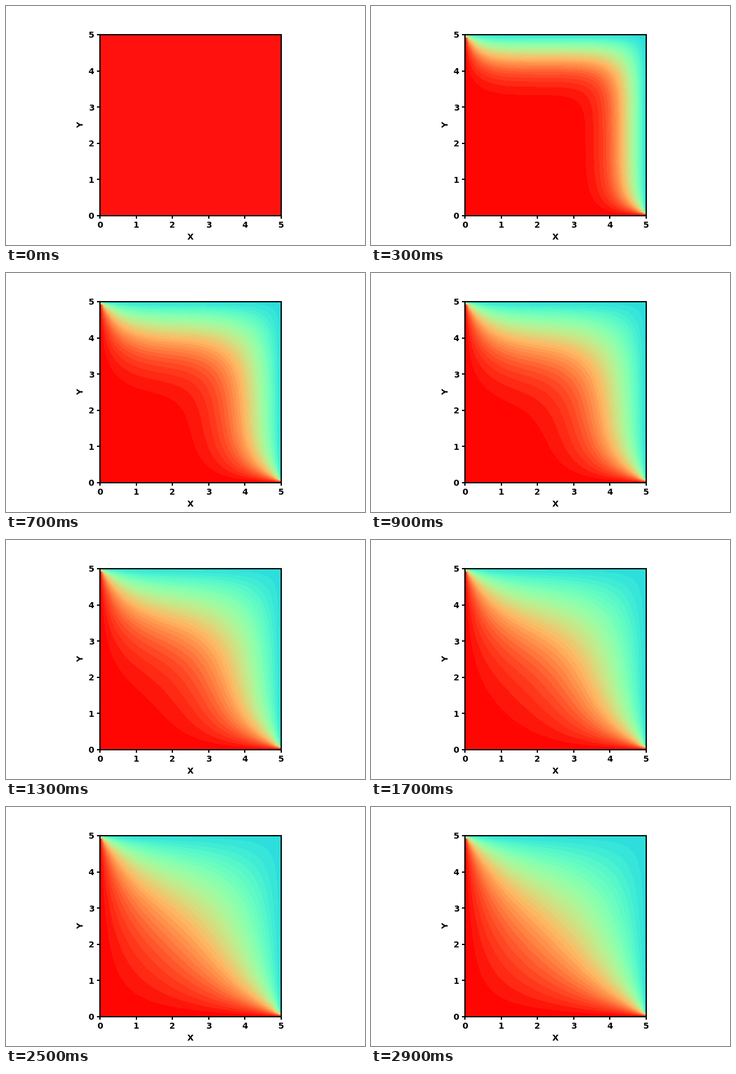
A matplotlib script for the animation above (3 s loop, 600 px wide and 400 px high).

```python
import numpy as np
import matplotlib.pyplot as plt
from matplotlib.animation import FuncAnimation

W, H, DPI = 600, 400, 100
FRAMES, INTERVAL = 30, 100

SIDE = 5.0
NODES = 51
HOT, COLD = 1.0, 1 / 3
STEPS = 50            # solver steps per frame
RATIO = 0.2           # diffusivity * dt / dx**2
LEVELS = np.linspace(0, 1, 50)
START_COLOR = "#ff120e"


def set_edges(u):
    u[:, 0] = HOT
    u[:, -1] = COLD
    u[0, :] = HOT
    u[-1, :] = COLD


def diffuse(u):
    mid = u[1:-1, 1:-1]
    around = u[2:, 1:-1] + u[:-2, 1:-1] + u[1:-1, 2:] + u[1:-1, :-2]
    u[1:-1, 1:-1] = mid + RATIO * (around - 4 * mid)


def solve():
    """Temperature field for every frame of a plate cooled from two sides."""
    u = np.full((NODES, NODES), HOT)
    fields = [u.copy()]
    set_edges(u)
    for _ in range(FRAMES - 1):
        for _ in range(STEPS):
            diffuse(u)
        fields.append(np.clip(u, 0, 1))
    return fields


plt.rcParams.update({
    "font.family": "DejaVu Sans",
    "font.weight": "bold",
    "axes.labelweight": "bold",
    "axes.linewidth": 1.5,
    "xtick.major.width": 1.5,
    "ytick.major.width": 1.5,
})

fig = plt.figure(figsize=(W / DPI, H / DPI), dpi=DPI)
ax = fig.add_axes([157 / W, 49.4 / H, 302.6 / W, 302.6 / H])
ax.set_facecolor(START_COLOR)
ax.set_xlabel("X")
ax.set_ylabel("Y")
ax.set_xticks(range(6))
ax.set_yticks(range(6))

grid = np.linspace(0, SIDE, NODES)
fields = solve()
shown = []


def draw(i):
    while shown:
        shown.pop().remove()
    # the plate is still uniform at the start, so only the background shows
    if i > 0:
        shown.append(ax.contourf(grid, grid, fields[i], levels=LEVELS,
                                 cmap="rainbow", vmin=0, vmax=1))
    ax.set_xlim(0, SIDE)
    ax.set_ylim(0, SIDE)
    return []


anim = FuncAnimation(fig, draw, frames=FRAMES, interval=INTERVAL,
                     init_func=lambda: draw(0), repeat=True, repeat_delay=0)
plt.show()
```
